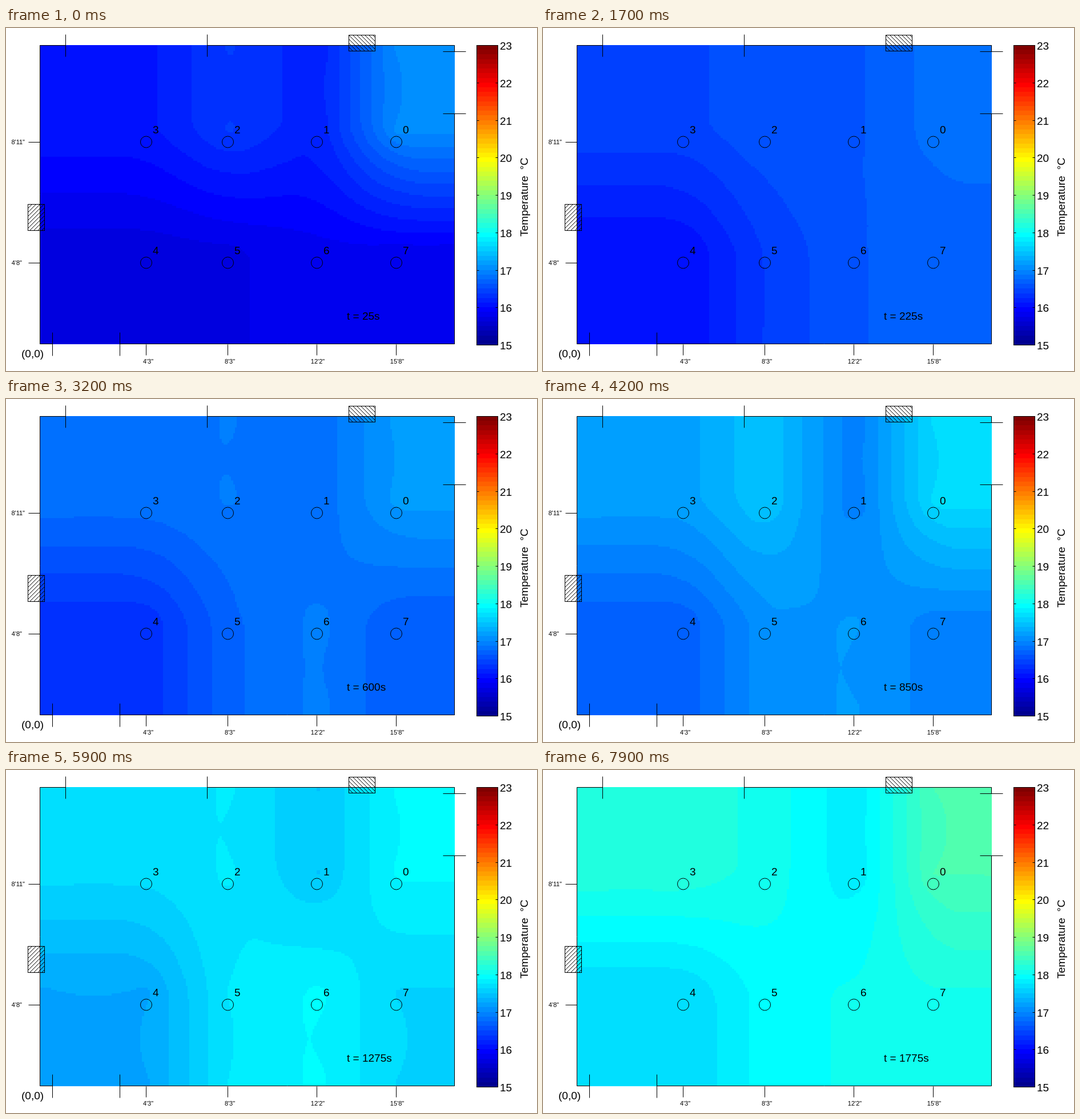
Recreate the animation shown at these times as an HTML page with a canvas. Size 930 by 602 pixels, loop 8000 ms.

```html
<!DOCTYPE html>
<html lang="en">
<head>
<meta charset="utf-8">
<title>Room temperature map</title>
<style>
html, body { margin: 0; width: 100%; height: 100%; overflow: hidden; background: #fff; }
canvas { display: block; }
</style>
</head>
<body>
<canvas id="stage" width="930" height="602"></canvas>
<script>
const start = performance.now();
const LOOP = 8000, HOLD = 900, STEP = 100;
const ctx = document.getElementById('stage').getContext('2d');
const FONT = '"Liberation Sans", Arial, sans-serif';

// Room rectangle and the resolution of the map
const room = { x: 59, y: 30, w: 727, h: 525 };
const COLS = 219, ROWS = 158;

// Interpolation nodes: the sensors, repeated on the walls
const nodeX = [59, 248, 391, 548, 686, 786];
const nodeY = [30, 181, 389, 555];

// Readings in colour levels (1/8 degree above 15): sensors 3 2 1 0, then 4 5 6 7
const readings = [
  { t: 25,   v: [8.72, 11.1, 9.25, 16.3, 5.43, 5.78, 6.7, 6.6] },
  { t: 225,  v: [11.65, 12.8, 12.8, 14.42, 8.03, 11.15, 12.92, 13.45] },
  { t: 350,  v: [14.97, 15.77, 15.25, 21.3, 11.65, 12.97, 13.7, 13.1] },
  { t: 600,  v: [14.57, 15.06, 14.3, 17.28, 10.33, 13.75, 15.28, 13.13] },
  { t: 850,  v: [17.55, 19.92, 15.25, 21.3, 13.33, 16.7, 17.08, 15.5] },
  { t: 1275, v: [21.38, 22.12, 19.95, 23.18, 17.88, 22.1, 23.2, 20.93] },
  { t: 1775, v: [25.68, 24.65, 22.2, 28.06, 21.06, 23.5, 24.2, 24.9] }
];

const clamp = (v, lo, hi) => Math.max(lo, Math.min(hi, v));

function jet(k) {
  const v = (k + 1) / 16;
  return [[1.5, 4.5], [0.5, 3.5], [-0.5, 2.5]]
    .map(([lo, hi]) => Math.round(255 * clamp(Math.min(v - lo, hi - v), 0, 1)));
}
const palette = Array.from({ length: 64 }, (_, k) => jet(k));

// Part of a convex polygon where a*x + b*y <= c
function clip(poly, a, b, c) {
  const n = poly.length, d = new Array(n);
  let cut = false;
  for (let i = 0; i < n; i++) {
    d[i] = a * poly[i][0] + b * poly[i][1] - c;
    if (d[i] > 0) cut = true;
  }
  if (!cut) return poly;
  const out = [];
  for (let i = 0; i < n; i++) {
    const j = (i + 1) % n, p = poly[i], q = poly[j];
    if (d[i] <= 0) out.push(p);
    if ((d[i] < 0 && d[j] > 0) || (d[i] > 0 && d[j] < 0)) {
      const f = d[i] / (d[i] - d[j]);
      out.push([p[0] + f * (q[0] - p[0]), p[1] + f * (q[1] - p[1])]);
    }
  }
  return out;
}

function area(poly) {
  let sum = 0;
  for (let i = 1; i + 1 < poly.length; i++) {
    const [x, y] = poly[0];
    sum += (poly[i][0] - x) * (poly[i + 1][1] - y) - (poly[i + 1][0] - x) * (poly[i][1] - y);
  }
  return Math.abs(sum) / 2;
}

// Cut a polygon into bands at the midlines between nodes
function bands(poly, nodes, a, b, visit) {
  for (let i = 0; i < nodes.length && poly.length > 2; i++) {
    if (i === nodes.length - 1) { visit(poly, i); break; }
    const mid = (nodes[i] + nodes[i + 1]) / 2;
    const part = clip(poly, a, b, mid);
    if (part.length > 2) visit(part, i);
    if (part === poly) break;
    poly = clip(poly, -a, -b, -mid);
  }
}

// Natural neighbour weights of the eight sensors at one point
function addWeights(x, y, out, at) {
  const far = 1e4;
  let cell = [[-far, -far], [far, -far], [far, far], [-far, far]];
  for (const nx of nodeX) {
    for (const ny of nodeY) {
      const dx = nx - x, dy = ny - y;
      if (dx * dx + dy * dy < 1e-6) continue;
      cell = clip(cell, dx, dy, (nx * nx + ny * ny - x * x - y * y) / 2);
    }
  }
  const total = area(cell);
  bands(cell, nodeX, 1, 0, (strip, c) => {
    bands(strip, nodeY, 0, 1, (part, r) => {
      const sensor = clamp(c - 1, 0, 3) + (r > 1 ? 4 : 0);
      out[at + sensor] += area(part) / total;
    });
  });
}

const weights = new Float32Array(COLS * ROWS * 8);
for (let r = 0, at = 0; r < ROWS; r++) {
  for (let c = 0; c < COLS; c++, at += 8) {
    addWeights(room.x + (c + 0.5) * room.w / COLS, room.y + (r + 0.5) * room.h / ROWS, weights, at);
  }
}

const map = document.createElement('canvas');
map.width = COLS;
map.height = ROWS;
const mapCtx = map.getContext('2d');
const pixels = mapCtx.createImageData(COLS, ROWS);

function levelsAt(t) {
  let i = 0;
  while (i < readings.length - 2 && t > readings[i + 1].t) i++;
  const a = readings[i], b = readings[i + 1];
  const f = clamp((t - a.t) / (b.t - a.t), 0, 1);
  return a.v.map((v, k) => v + f * (b.v[k] - v));
}

function drawMap(t) {
  const levels = levelsAt(t);
  for (let i = 0; i < COLS * ROWS; i++) {
    let sum = 0;
    for (let k = 0; k < 8; k++) sum += weights[i * 8 + k] * levels[k];
    const rgb = palette[clamp(Math.floor(sum), 0, 63)];
    for (let k = 0; k < 3; k++) pixels.data[i * 4 + k] = rgb[k];
    pixels.data[i * 4 + 3] = 255;
  }
  mapCtx.putImageData(pixels, 0, 0);
  ctx.imageSmoothingEnabled = false;
  ctx.drawImage(map, room.x, room.y, room.w, room.h);
}

function line(x1, y1, x2, y2) {
  ctx.beginPath();
  ctx.moveTo(x1 + 0.5, y1 + 0.5);
  ctx.lineTo(x2 + 0.5, y2 + 0.5);
  ctx.stroke();
}

function text(s, x, y, size = 19, align = 'left') {
  ctx.font = size + 'px ' + FONT;
  ctx.textAlign = align;
  ctx.fillText(s, x, y);
}

function hatch(x, y, w, h, gap, lean) {
  ctx.save();
  ctx.beginPath();
  ctx.rect(x, y, w, h);
  ctx.clip();
  for (let d = -h; d < w + h; d += gap) {
    line(x + d, lean > 0 ? y : y + h, x + d + h, lean > 0 ? y + h : y);
  }
  ctx.restore();
  ctx.strokeRect(x + 0.5, y + 0.5, w, h);
}

function drawWalls() {
  const right = 785, bottom = 554;
  line(59, 30, 104, 30);
  line(352, 30, right, 30);
  line(59, 30, 59, bottom);
  line(right, 30, right, 41);
  line(right, 150, right, bottom);
  line(59, bottom, 81, bottom);
  line(199, bottom, right, bottom);
  for (const x of [104, 352]) line(x, 11, x, 50);
  for (const x of [81, 199]) line(x, 534, x, 575);
  for (const y of [41, 150]) line(765, y, 805, y);
  hatch(600, 12, 46, 28, 7, 1);
  hatch(38, 309, 29, 46, 7, -1);
}

function drawSensors() {
  const xs = [245, 388, 544, 683];
  const feet = ['4\'3"', '8\'3"', '12\'2"', '15\'8"'];
  xs.forEach((x, i) => {
    [[200, 3 - i], [412, 4 + i]].forEach(([y, id]) => {
      ctx.beginPath();
      ctx.arc(x + 0.5, y, 10, 0, Math.PI * 2);
      ctx.stroke();
      text(id, x + 12, y - 15);
    });
    line(x, 555, x, 574);
    text(feet[i], x + 4 - (i > 1 ? 2 : 0), 589, 11, 'center');
  });
  [[200, '8\'11"'], [412, '4\'8"']].forEach(([y, label]) => {
    line(39, y, 59, y);
    text(label, y === 200 ? 33 : 28, y + 4, 11, 'right');
  });
  text('(0,0)', 27, 578);
}

function drawScale() {
  const x = 824, y = 30, w = 37, h = 526;
  palette.forEach((rgb, k) => {
    const top = Math.round(y + h * (63 - k) / 64);
    ctx.fillStyle = `rgb(${rgb})`;
    ctx.fillRect(x, top, w, Math.round(y + h * (64 - k) / 64) - top);
  });
  ctx.fillStyle = '#000';
  ctx.strokeRect(x + 0.5, y + 0.5, w, h);
  for (let deg = 15; deg <= 23; deg++) {
    const ty = Math.round(y + h * (23 - deg) / 8);
    line(x, ty, x + 4, ty);
    line(x + w - 4, ty, x + w, ty);
    text(deg, 865, ty + 8);
  }
  ctx.save();
  ctx.translate(914, 366);
  ctx.rotate(-Math.PI / 2);
  text('Temperature\u00a0\u00a0°C', 0, 0);
  ctx.restore();
}

function draw(t) {
  ctx.fillStyle = '#fff';
  ctx.fillRect(0, 0, 930, 602);
  drawMap(t);
  ctx.fillStyle = ctx.strokeStyle = '#000';
  ctx.lineWidth = 1;
  drawWalls();
  drawSensors();
  text(`t = ${t}s`, 597, 512);
  drawScale();
}

let shown = -1;
function frame() {
  const ms = (performance.now() - start) % LOOP;
  const t = 25 * (1 + Math.max(0, Math.floor((ms - HOLD) / STEP)));
  if (t !== shown) draw(shown = t);
  requestAnimationFrame(frame);
}
frame();
</script>
</body>
</html>
```
